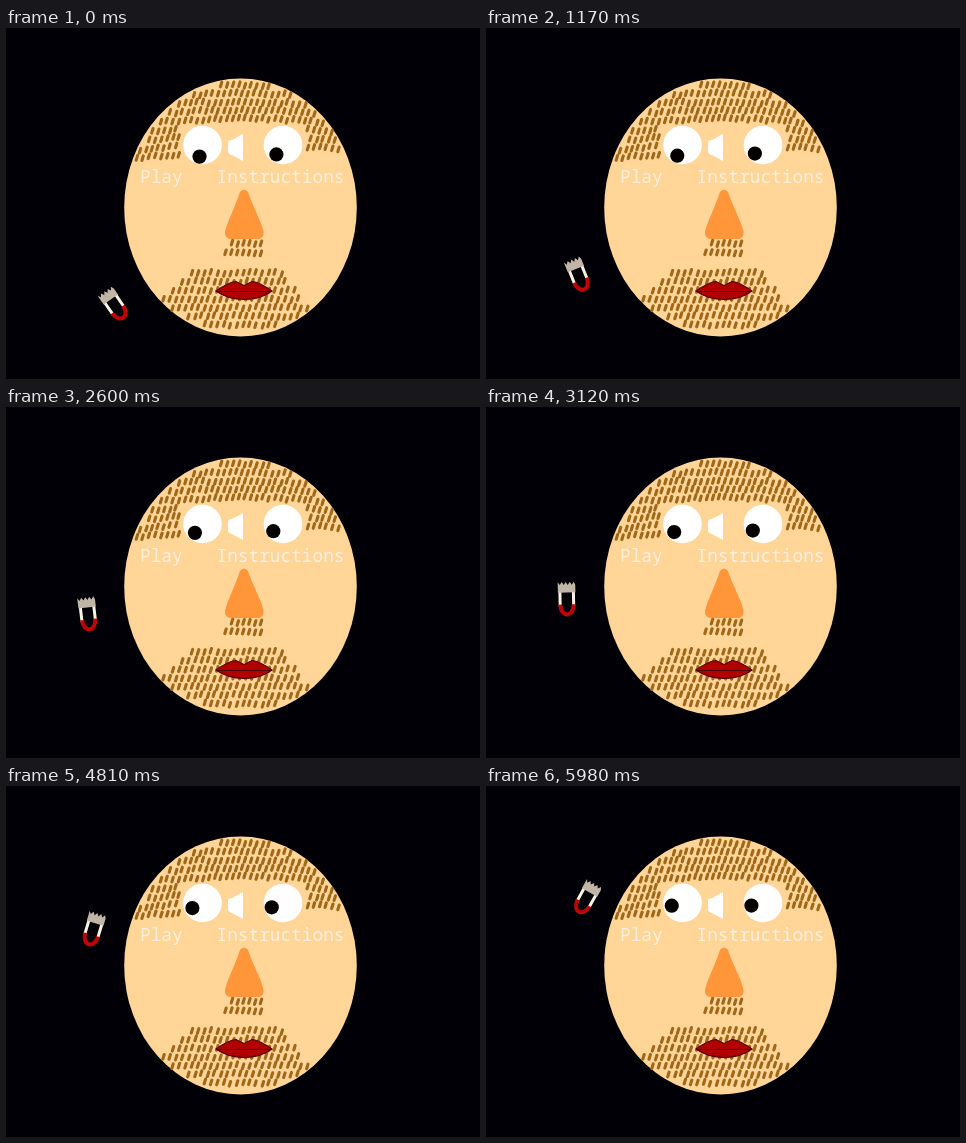
An HTML page that plays this animation: 474x351 px, repeating every 6.11 s.

```html
<!DOCTYPE html>
<html lang="en">
<head>
<meta charset="utf-8">
<title>Shave</title>
<style>
  html, body { margin: 0; width: 100%; height: 100%; overflow: hidden; background: #000006; }
  svg { display: block; width: 100vw; height: 100vh; }
  text { font: 300 17.8px "Noto Sans Mono", "Liberation Mono", monospace; fill: #fff0dc; }
</style>
</head>
<body>
<svg viewBox="0 0 474 351">
  <ellipse cx="234.5" cy="179.5" rx="116.3" ry="129" fill="#ffd598"/>
  <path id="hair" fill="none" stroke="#a0681a" stroke-width="3.1" stroke-linecap="round"/>

  <g fill="#fff">
    <circle cx="196.5" cy="117" r="19.3"/>
    <circle cx="277" cy="117" r="19.3"/>
    <path d="M222 115Q222 112 226 112L237 106V133L226 127Q222 126 222 123Z"/>
  </g>
  <g fill="#050000">
    <circle id="leftPupil" r="7.1"/>
    <circle id="rightPupil" r="7.1"/>
  </g>

  <text x="134" y="155">Play</text>
  <text x="210.5" y="155">Instructions</text>

  <path fill="#ff963a" d="M234 164Q238 159 242 164C246 177 256 194 257.5 204Q258 210.5 252 211H225Q218.500 210.500 219 204C221 194 230 177 234 164Z"/>

  <g stroke="#520000" stroke-width="1.1">
    <path fill="#b00000" d="M210 263C217 258 224 254 230 253.500L238 257.500 246 253.500C252 254 259 258 266 263C258 269 250 271.500 238 271.500C226 271.500 217 268 210 263Z"/>
    <path d="M210 263.500H266"/>
  </g>

  <g id="razor">
    <path fill="#fbf3e2" d="M72.500 181h3v15h-3zM86 181h3v15h-3z"/>
    <path fill="#c0b5a6" d="M72 182V171.500l2 3 2-3 2 3 2-3 2 3 2-3 2 3 2-3 1.500 3V182Z"/>
    <path fill="none" stroke="#c00404" stroke-width="4" d="M74 194C74.500 207.300 87 207.300 87.500 194"/>
  </g>
</svg>
<script>
const byId = id => document.getElementById(id);
const STEP = 130, STEPS = 47, DEGREES_PER_STEP = 1.385;

let seed = 7;
const jitter = size => {
  seed = (seed * 16807) % 2147483647;
  return (seed / 2147483647 - 0.5) * size;
};

const insideFace = (x, y) => ((x - 234.5) / 115) ** 2 + ((y - 179.5) / 128) ** 2 < 1;
const stubble = (x, y) => `M${(x - 0.7).toFixed(1)} ${(y + 2.3).toFixed(1)}l1.4 -4.6`;

// Lays rows of short strokes wherever the region test allows them.
function growHair(top, bottom, rowGap, columnGap, bend, allowed) {
  let path = "";
  for (let y = top, row = 0; y < bottom; y += rowGap, row++) {
    for (let x = 122 + (row % 2) * columnGap / 2; x < 350; x += columnGap) {
      const px = x + jitter(1), py = y + bend * (x - 235) ** 2 + jitter(2.5);
      if (insideFace(px, py - 2.5) && insideFace(px, py + 2.5) && allowed(px, py)) path += stubble(px, py);
    }
  }
  return path;
}

const hairline = x => x < 174 ? 132 : x < 300 ? 95 : 127;
const beardline = x => x < 188 ? 241 + (188 - x) * 0.95
  : x > 274 ? 241 + (x - 274) * 1.25
  : 241 + 3 * Math.sin((x - 188) / 86 * Math.PI);

let hair = growHair(48.500, 134, 8.4, 6, 0.0006, (x, y) => y < hairline(x))
  + growHair(245, 308, 8.6, 6.4, 0, (x, y) => y > beardline(x));
for (let x = 226; x < 256; x += 5.8) hair += stubble(x, 215.5 + jitter(2));
for (let x = 219.5; x < 257; x += 5.9) hair += stubble(x, 225 + jitter(2));
byId("hair").setAttribute("d", hair);

function placePupil(id, cx, cy, radius, degrees) {
  const angle = degrees * Math.PI / 180;
  byId(id).setAttribute("cx", cx + radius * Math.cos(angle));
  byId(id).setAttribute("cy", cy + radius * Math.sin(angle));
}

function draw() {
  const turn = Math.floor(performance.now() / STEP) % STEPS * DEGREES_PER_STEP;
  // The razor circles the face while both pupils follow at the same rate.
  byId("razor").setAttribute("transform", `rotate(${turn - 34.5} 237 188)`);
  placePupil("leftPupil", 196.8, 117.9, 11.2, 107 + turn);
  placePupil("rightPupil", 273.4, 119, 8, 112 + turn);
  requestAnimationFrame(draw);
}
draw();
</script>
</body>
</html>
```
